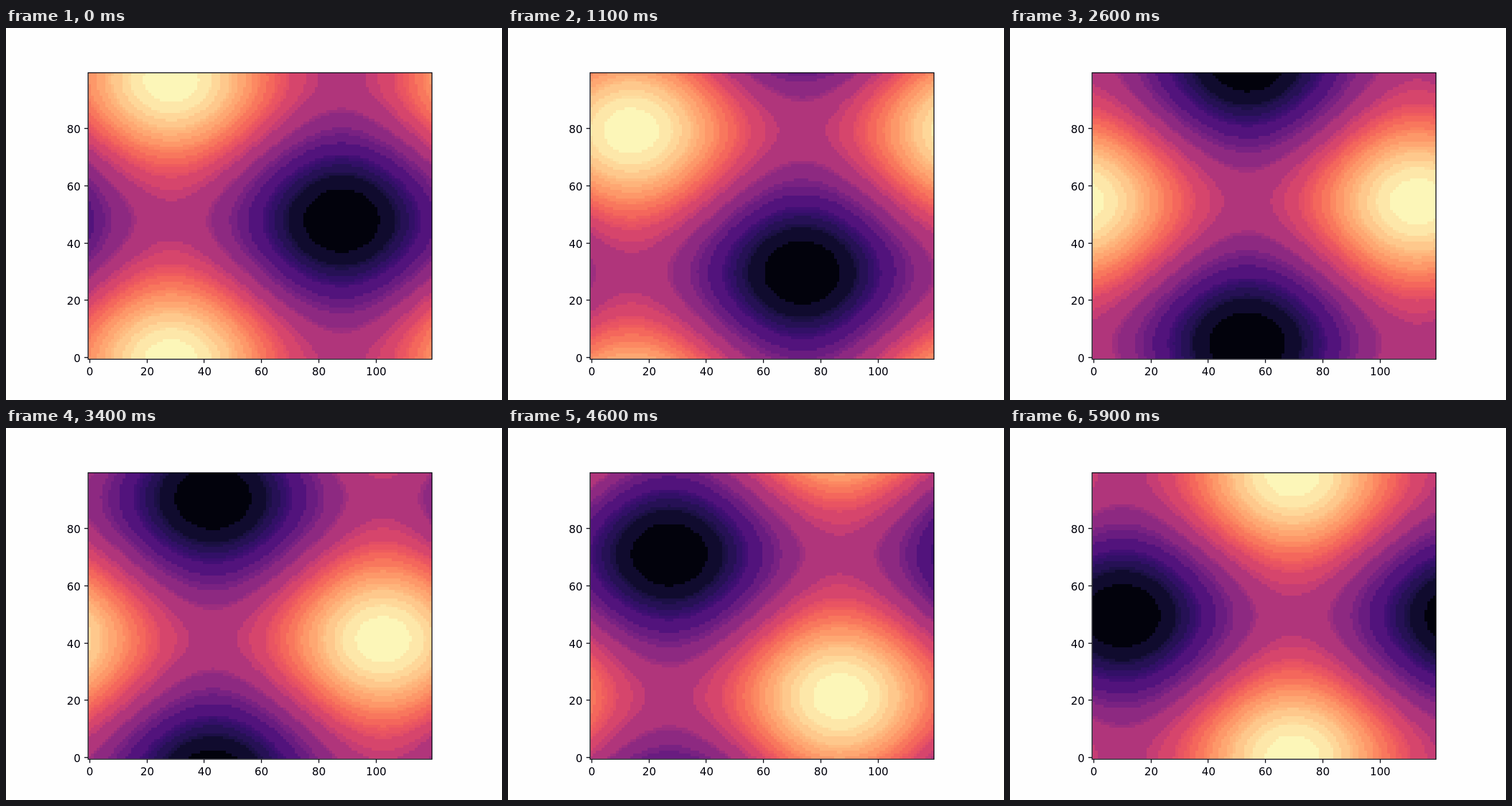
Animation, 864 px wide and 648 px high, one loop 6000 ms. Source, as an HTML page with a canvas:

```html
<!DOCTYPE html>
<html lang="en">
<head>
<meta charset="utf-8">
<title>Drifting wave field</title>
<style>
  html, body { margin: 0; width: 100%; height: 100%; overflow: hidden; background: #fefefe; }
  canvas { position: absolute; left: 144px; top: 78px; }
  svg { position: absolute; left: 0; top: 0; }
  text { font: 18.75px "DejaVu Sans", sans-serif; fill: #02020c; }
  path { fill: none; stroke: #02020c; stroke-width: 1.5; }
</style>
</head>
<body>
<canvas id="plot" width="598" height="498"></canvas>
<svg id="axes" width="864" height="648" viewBox="0 0 864 648"></svg>
<script>
const COLS = 120, ROWS = 100, STEPS = 60, STEP_MS = 100;
const LEFT = 143.4, TOP = 77.76, BOTTOM = 576.72, CELL = 4.9896;
const DIGIT = 11.93;

// Colour bands: first level (0-255) and colour.
const BANDS = [
  [0, '02020c'], [15, '100b2e'], [29, '19103f'], [30, '1c1046'], [34, '261155'],
  [43, '321067'], [50, '3c0f70'], [54, '420f75'], [57, '52137c'], [74, '691c80'],
  [86, '792282'], [94, '8d2981'], [111, '9c2e7f'], [114, 'a02f7f'], [115, 'b0357b'],
  [134, 'c63d74'], [142, 'd6456c'], [155, 'e24e66'], [159, 'e95462'], [166, 'ee5c5e'],
  [170, 'f4675c'], [179, 'f8775d'], [188, 'fa825f'], [190, 'fc8962'], [196, 'fd9869'],
  [205, 'fea772'], [213, 'feb47b'], [219, 'febd82'], [222, 'fec88c'], [231, 'fed799'],
  [238, 'fddea0'], [239, 'fde7a9'], [248, 'fcf6b8']
];

const palette = new Array(256);
for (const [start, hex] of BANDS) {
  palette.fill([0, 2, 4].map(k => parseInt(hex.slice(k, k + 2), 16)), start);
}

const ctx = document.getElementById('plot').getContext('2d');
const grid = document.createElement('canvas');
grid.width = COLS;
grid.height = ROWS;
const gridCtx = grid.getContext('2d');
const img = gridCtx.createImageData(COLS, ROWS);

const wave = (fn, count, shift) =>
  Array.from({ length: count }, (_, i) => fn(i / (count - 1) * 2 * Math.PI + shift));

function drawField(step) {
  const xs = wave(Math.sin, COLS, (step + 1) * Math.PI / 45);
  const ys = wave(Math.cos, ROWS, (step + 1) * Math.PI / 30);
  const min = Math.min(...xs) + Math.min(...ys);
  const range = Math.max(...xs) + Math.max(...ys) - min;
  for (let r = 0; r < ROWS; r++) {
    for (let c = 0; c < COLS; c++) {
      const level = Math.floor((xs[c] + ys[r] - min) / range * 256);
      const rgb = palette[Math.max(0, Math.min(255, level))];
      const p = ((ROWS - 1 - r) * COLS + c) * 4;
      img.data.set(rgb, p);
      img.data[p + 3] = 255;
    }
  }
  gridCtx.putImageData(img, 0, 0);
  ctx.imageSmoothingEnabled = false;
  ctx.drawImage(grid, LEFT - 144, TOP - 78, COLS * CELL, ROWS * CELL);
}

function drawAxes() {
  let path = 'M143 78H742V577H143Z', labels = '';
  const label = (x, y, n) => {
    labels += `<text x="${Math.round(x)}" y="${Math.round(y)}">${n}</text>`;
  };
  for (let n = 0; n <= 100; n += 20) {
    const x = LEFT + (n + 0.5) * CELL;
    const width = String(n).length * DIGIT;
    path += `M${Math.round(x)} 577v6.56`;
    label(x - width / 2, 605, n);
    if (n < ROWS) {
      const y = BOTTOM - (n + 0.5) * CELL;
      path += `M143 ${Math.round(y)}h-6.56`;
      label(130.3 - width, y + 8, n);
    }
  }
  document.getElementById('axes').innerHTML = `<path d="${path}"/>${labels}`;
}

const startTime = performance.now();
let shown = 0;

function tick() {
  const elapsed = performance.now() - startTime;
  const step = Math.floor(elapsed / STEP_MS) % STEPS;
  if (step !== shown) drawField(shown = step);
  requestAnimationFrame(tick);
}

drawAxes();
drawField(0);
requestAnimationFrame(tick);
</script>
</body>
</html>
```
